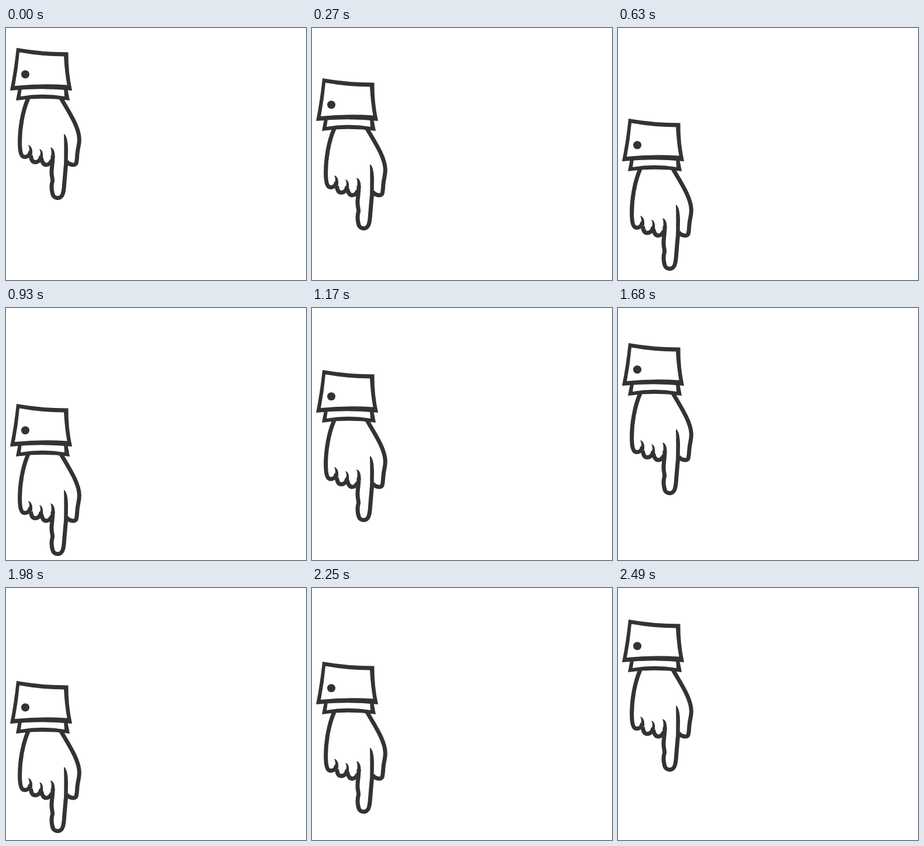
Animation, 513 px wide and 431 px high, one loop 2520 ms. Source, as an HTML page:

```html
<!DOCTYPE html>
<html lang="en">
<head>
<meta charset="utf-8">
<title>Pointing hand</title>
<style>
  html, body { margin: 0; width: 100%; height: 100%; overflow: hidden; background: #fff; }
  svg { display: block; width: 513px; height: 431px; }
  .line { fill: none; stroke: #333; stroke-width: 7; stroke-linejoin: round; }
  .ink { fill: #333; fill-rule: evenodd; }
</style>
</head>
<body>
<svg viewBox="0 0 513 431">
  <g id="hand">
    <!-- palm, curled fingers, index finger, thumb -->
    <g class="line">
      <path d="M38 120C28 143 23.6 172 23.6 195C23.6 212 26 220.500 32 220.500C37 220.500 41 217 41.500 211"/>
      <path d="M42.500 218C43 226 46 229.500 50 229.500C55 229.500 59 226 60 219"/>
      <path d="M60.500 223C62 231 65 234 69 234C73 234 76 231 78.500 226"/>
      <path d="M80 218C80 232 77.500 240 78 248C78 254 80 258 79.500 262C77.500 268 77.500 276 79.700 284C82 293 94 293 97 284C99.700 276 99.300 268 100 262L102.300 235"/>
      <path d="M94 120C104 138 125 168 125.300 190C125.500 200 123 204 122.200 213C121.200 222 121.500 228 119.700 232C117.500 235.500 108 234.500 103.500 228"/>
    </g>
    <g class="ink">
      <path d="M38 200C45 202 46 211 44.500 218L38 214C41 209 40 205 38 200Z"/>
      <path d="M57 207C63 208 64 216 62.500 224L57 221C60 215 59 211 57 207Z"/>
      <path d="M76 204C83 206 83.500 214 83.500 222L77 222C78 214 78 209 76 204Z"/>
      <path d="M99 181C104 183 106 196 106 208L105.500 238L99 238C99.500 220 99.500 200 99 181Z"/>
      <!-- sleeve, shirt cuff, button -->
      <path d="M18 34Q60 41.500 106.500 41.500Q106 75 113 107Q60 101.500 7 107Q14 72 18 34ZM23 41.500Q62 48.500 99 48.500Q100.500 75 104.500 97.500Q60 94.500 15 99Q20.500 70 23 41.500Z"/>
      <path d="M21 103L17 124Q62 117.500 109 124L105 103L99 103L100 117Q62 110.500 25 117L27 103Z"/>
      <circle cx="33" cy="79.300" r="7"/>
    </g>
  </g>
</svg>
<script>
  const TICK = 30, TICKS = 84, DEPTH = 136;
  const turns = [0, 28, 50.8, 69.2, 88.2];  // ticks at which the hand reverses
  const kick = [0.94, 0, 0, 0.7];           // starting speed of each swing
  const hand = document.getElementById('hand');

  const ease = (s, v) => s * s * (3 - 2 * s) + v * s * (1 - s) ** 2;

  function drop(tick) {
    const i = turns.findIndex(t => t > tick) - 1;
    const p = ease((tick - turns[i]) / (turns[i + 1] - turns[i]), kick[i]);
    return DEPTH * (i % 2 ? 1 - p : p);
  }

  const start = performance.now();
  function draw() {
    const tick = Math.floor((performance.now() - start) / TICK + 0.01) % TICKS;
    hand.setAttribute('transform', `translate(0 ${Math.round(drop(tick))})`);
    requestAnimationFrame(draw);
  }
  draw();
</script>
</body>
</html>
```
